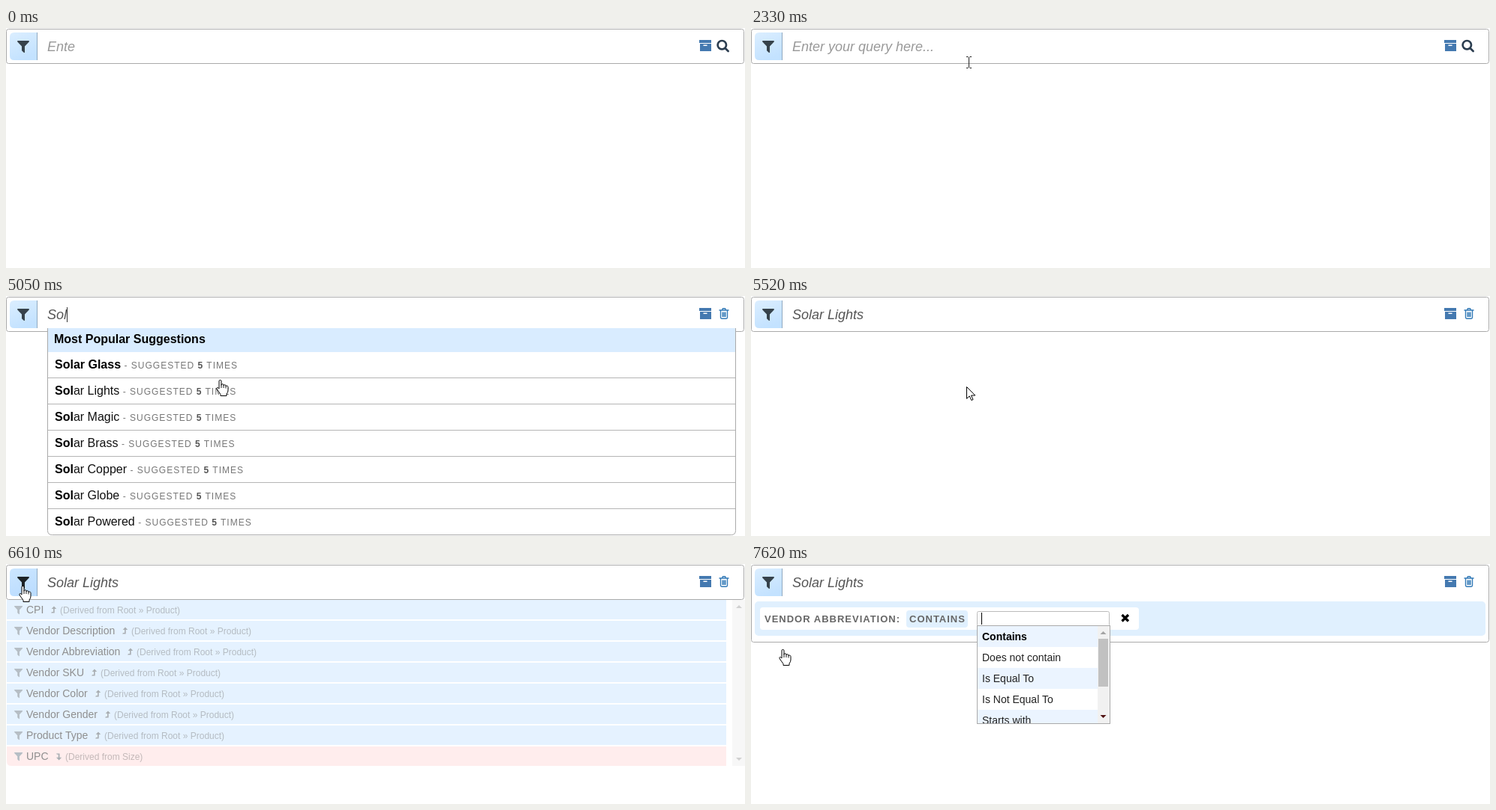
Recreate the animation shown at these times as an HTML page. Size 985 px wide and 321 px high, loop 8000 ms.

```html
<!DOCTYPE html>
<html lang="en">
<head>
<meta charset="utf-8">
<title>Query builder</title>
<style>
  html, body { margin: 0; width: 100%; height: 100%; overflow: hidden; background: #fff; }
  svg { display: block; width: 985px; height: 321px; }
  text { font: 14px "Liberation Sans", Arial, sans-serif; fill: #222; white-space: pre; }
  .query { font-size: 18px; font-style: italic; fill: #555; }
  .query.hint { fill: #999; }
  .item, .head { font-size: 16px; fill: #111; }
  .head, .bold, .hover .name { font-weight: bold; fill: #000; }
  .count { font-size: 12px; font-weight: normal; letter-spacing: 1px; fill: #777; }
  .count .five { font-weight: bold; fill: #555; }
  .from { font-size: 12px; fill: #6d7b88; }
  .tag { font-size: 13px; font-weight: bold; letter-spacing: 1px; fill: #666; }
  .row rect { fill: #cce6ff; }
  .row.hover rect { fill: #c5dfff; }
  .row.down path.back { fill: #fdd; }
  .row.down .from { fill: #8a7474; }
</style>
</head>
<body>
<svg id="stage" viewBox="0 0 985 321"></svg>
<script>
const LOOP = 8000;
const HINT = "Enter your query here...";
const FUNNEL = "M.6 0H15.4Q16.4 .6 15.7 1.5L10 7.6V15.4Q9.6 16.3 8.7 15.7L6.3 13.6Q6 13.3 6 12.8V7.6L.3 1.5Q-.4 .6 .6 0Z";
const ITEMS = ["Glass", "Lights", "Magic", "Brass", "Copper", "Globe", "Powered"];
const FIELDS = ["CPI", "Vendor Description", "Vendor Abbreviation", "Vendor SKU",
  "Vendor Color", "Vendor Gender", "Product Type", "UPC"];
const OPTIONS = ["Contains", "Does not contain", "Is Equal To", "Is Not Equal To", "Starts with"];

// [time, value] steps
const HINT_LENGTH = [[0, 4], [70, 5], [210, 7], [290, 8], [370, 9], [450, 10], [590, 12], [820, 13],
  [960, 14], [1000, 15], [1160, 16], [1300, 18], [1620, 19], [1700, 21], [2080, 22], [2330, 24]];
const TYPED = [[0, ""], [2620, "S"], [2860, "Sol"], [5420, "Solar Lights"]];
const CARET = [[0, 0], [1380, 55], [1930, 0], [2620, 67], [2860, 81], [3330, 0], [3880, 81], [5420, 0]];

// Pointer moves: start, end, number of positions, path
const MOVES = [
  [590, 820, 4, [[802, 302], [548, 236], [400, 130], [303, 68]]],
  [960, 1000, 2, [[299, 61], [290, 50]]],
  [1160, 1380, 3, [[290, 49], [290, 46]]],
  [3950, 4090, 2, [[287, 48], [283, 51]]],
  [4570, 5120, 8, [[283, 58], [286.5, 121]]],
  [5880, 6540, 9, [[270, 116], [150, 88], [75, 68], [45, 50], [23, 29]]],
  [6690, 7160, 7, [[24, 34], [43, 114]]]
];

const rect = (x, y, w, h, fill, extra = "") =>
  `<rect x="${x}" y="${y}" width="${w}" height="${h}" fill="${fill}" ${extra}/>`;
const path = (d, fill, extra = "") => `<path d="${d}" fill="${fill}" ${extra}/>`;
const text = (x, y, cls, body) => `<text x="${x}" y="${y}" class="${cls}">${body}</text>`;
const group = (id, body, extra = "") => `<g id="${id}" ${extra}>${body}</g>`;

function suggestion(name, i) {
  const y = 97 + 35 * i;
  const line = i < 6 ? rect(56, y + 12, 916, 1, "#b5b5b5") : "";
  return line + text(65, y, "item", `<tspan class="bold">Sol</tspan><tspan class="name">ar ${name}</tspan> ` +
    `<tspan class="count">- SUGGESTED <tspan class="five">5</tspan> TIMES</tspan>`);
}

function field(name, i) {
  const down = i === 7;
  const back = down ? path("M1 0H960V26H7Q1 26 1 20Z", "#fdd", 'class="back"') : rect(1, 0, 959, 26, "#cce6ff");
  const arrow = down ? "M0 1H5V7H8L4 11L0 7H3V2.6H1Z" : "M0 10H5.2V4H8L4.4 0L.8 4H3.4V8.4H1.2Z";
  return `<g class="row ${down ? "down" : ""}" transform="translate(0 ${48 + 28 * i})">${back}` +
    path(FUNNEL, "#6f7f8d", 'transform="translate(11 8) scale(.7)"') + text(27, 18, "name", name) +
    `<g class="origin">${path(arrow, "#555f68", 'transform="translate(0 8.5) scale(.9)"')}` +
    text(12, 18, "from", down ? "(Derived from Size)" : "(Derived from Root » Product)") + "</g></g>";
}

const option = (name, i) =>
  rect(302, 83 + 28 * i, 160, 28, i % 2 ? "#fff" : "#ebf4ff") +
  text(308, 102 + 28 * i, i ? "" : "bold", name);

const outline = 'stroke="#000" stroke-width="1" stroke-linejoin="round"';

document.getElementById("stage").innerHTML = `
  <defs>
    <linearGradient id="blue" x2=".4" y2="1"><stop stop-color="#dbeeff"/><stop offset="1" stop-color="#c3e2ff"/></linearGradient>
    <linearGradient id="deep" x2=".4" y2="1"><stop stop-color="#cce6ff"/><stop offset="1" stop-color="#bcddff"/></linearGradient>
    <clipPath id="optionClip"><rect x="302" y="83" width="176" height="130"/></clipPath>
  </defs>` +
  rect(.5, 1.5, 983, 46, "#fff", 'id="frame" rx="3" stroke="#aaa"') +
  path("M42 6V43H11Q5 43 5 37V12Q5 6 11 6Z", "url(#blue)", 'id="button"') +
  rect(41, 6, 1, 37, "#8fa9bf") +
  path(FUNNEL, "#36424b", 'id="funnel" transform="translate(15 17)"') +
  path("M924 16H940V20H924ZM925 21H940V31H925ZM929.5 22.5V24H934.5V22.5Z", "#4479b0", 'fill-rule="evenodd"') +
  group("search", `<circle cx="954.3" cy="22.7" r="5.7"/><path d="M958.6 27L962.6 31" stroke-linecap="round"/>`,
    'fill="none" stroke="#2c3e50" stroke-width="2.7"') +
  group("trash", path("M950.5 19H963.5M954.5 18.5L955.5 16.7H958.5L959.5 18.5M952.5 19V28.5Q952.5 30.2 954 30.2H960Q961.5 30.2 961.5 28.5V19M955.2 21.5V28M957 21.5V28M958.8 21.5V28",
    "none", 'stroke="#337ab7" stroke-width="1.4"')) +
  text(55, 31, "query", "") +
  rect(0, 15, 1, 20, "#333", 'id="caret"') +
  group("menu",
    path("M55.5 43V313.5Q55.5 319.5 61.5 319.5H966.5Q972.5 319.5 972.5 313.5V43", "#fff", 'stroke="#aaa"') +
    rect(56, 43, 916, 32, "#d9ecff") +
    text(64, 63, "head", "Most Popular Suggestions") +
    ITEMS.map((name, i) => `<g class="suggestion">${suggestion(name, i)}</g>`).join("")) +
  group("list", FIELDS.map(field).join("") + rect(968, 48, 17, 222, "#f1f1f1") +
    path("M973 59L977 55L981 59ZM973 259L977 263L981 259Z", "#a3a3a3")) +
  group("filter",
    rect(5, 50, 974, 46, "#e0f0fe", 'rx="5"') + rect(12, 58, 505, 30, "#fff", 'rx="4"') +
    text(18, 78, "tag", "VENDOR ABBREVIATION:") +
    rect(207, 62, 82, 23, "#e0f0fe", 'rx="4"') + text(211, 78, "tag", "CONTAINS") +
    rect(301.5, 63.5, 176, 20, "#fff", 'rx="2" stroke="#bbb"') +
    path("M494.5 68L503 76.5M503 68L494.5 76.5", "none", 'stroke="#000" stroke-width="3.2"')) +
  group("options",
    rect(307, 65, 1, 16, "#000") +
    `<g clip-path="url(#optionClip)">${OPTIONS.map(option).join("")}</g>` +
    rect(462, 83, 16, 130, "#f1f1f1") + rect(463, 100, 13, 64, "#c1c1c1") +
    path("M465.5 94L469.5 90L473.5 94Z", "#a3a3a3") + path("M465.5 202L469.5 206L473.5 202Z", "#501010") +
    rect(301.5, 82.5, 177, 131, "none", 'stroke="#aaa"')) +
  group("pointer",
    group("arrow", path("M.5 .5V16.3L4.2 12.8L6.8 18.5L9 17.5L6.5 12H11.8Z", "#fff", outline)) +
    group("beam", path("M-3 -7.5H-.5M1.5 -7.5H4M.5 -7V7M-3 7.5H-.5M1.5 7.5H4", "none", 'stroke="#222"')) +
    group("hand", path("M-2 12V1.9a1.5 1.5 0 0 1 3 0V7.2q0-1.5 1.5-1.5T4 7.2v.7q.1-1.2 1.5-1.2T7 8.2v.8q.2-1 1.4-1T10 9.7V14q0 3-2 5v2.5H0v-2L-4.6 13q-1-1.7 0-2.4t2.6 1.4z", "#fff", outline) +
      path("M1 7V11M4 8V11M7 9V11.5", "none", 'stroke="#000" stroke-width=".9"')));

const $ = id => document.getElementById(id);
const queryText = document.querySelector(".query");
const suggestions = [...document.querySelectorAll(".suggestion")];
const rows = [...document.querySelectorAll(".row")];
const show = (id, on) => { $(id).style.display = on ? "" : "none"; };
const stepAt = (table, t) => table.findLast(([time]) => time <= t)[1];

function pointerAt(t) {
  const move = MOVES.findLast(([start]) => start <= t);
  if (!move) return null;
  const [start, end, count, points] = move;
  const k = Math.min(count - 1, Math.floor((t - start) / (end - start) * (count - 1) + 1e-6));
  const along = k / (count - 1) * (points.length - 1);
  const i = Math.min(points.length - 2, Math.floor(along));
  return points[i].map((v, axis) => Math.round(v + (points[i + 1][axis] - v) * (along - i)));
}

function pointerShape(t, x, y) {
  const overMenu = t >= 4170 && t < 5520 && y >= 75;
  const overList = t >= 6610 && y >= 48;
  if (overMenu || overList || (x < 42 && y < 47)) return "hand";
  return y < 47 ? "beam" : "arrow";
}

function placeOrigins() {
  for (const row of rows) {
    const width = row.querySelector(".name").getComputedTextLength();
    row.querySelector(".origin").setAttribute("transform", `translate(${Math.round(37 + width)} 0)`);
  }
}

function render(t) {
  const typed = stepAt(TYPED, t);
  queryText.textContent = typed || HINT.slice(0, stepAt(HINT_LENGTH, t));
  queryText.classList.toggle("hint", !typed);
  show("search", !typed);
  show("trash", typed);

  const caret = stepAt(CARET, t);
  show("caret", caret);
  $("caret").setAttribute("x", caret);

  const menu = t >= 4170 && t < 5420;
  const list = t >= 6610 && t < 7550;
  const filter = t >= 7550;
  show("menu", menu);
  show("list", list);
  show("filter", filter);
  show("options", t >= 7620);
  $("list").style.opacity = t < 6690 ? .5 : 1;
  $("frame").setAttribute("height", filter ? 103 : 46);

  const at = pointerAt(t);
  show("pointer", at);
  const [x, y] = at || [999, 999];
  $("pointer").setAttribute("transform", `translate(${x} ${y})`);
  const shape = pointerShape(t, x, y);
  for (const id of ["arrow", "beam", "hand"]) show(id, id === shape);

  const onButton = x < 42 && y < 47;
  $("button").setAttribute("fill", onButton ? "url(#deep)" : "url(#blue)");
  $("funnel").setAttribute("fill", onButton ? "#1c2226" : "#36424b");

  const item = !menu || y < 75 ? -1 : t < 5120 ? 0 : 1;
  suggestions.forEach((el, i) => el.classList.toggle("hover", i === item));
  const over = list && y >= 48 ? Math.floor((y - 48) / 28) : -1;
  rows.forEach((el, i) => el.classList.toggle("hover", i === over));
  if (list) placeOrigins();
}

const began = performance.now();
function tick() {
  render((performance.now() - began) % LOOP);
  requestAnimationFrame(tick);
}
tick();
</script>
</body>
</html>
```
